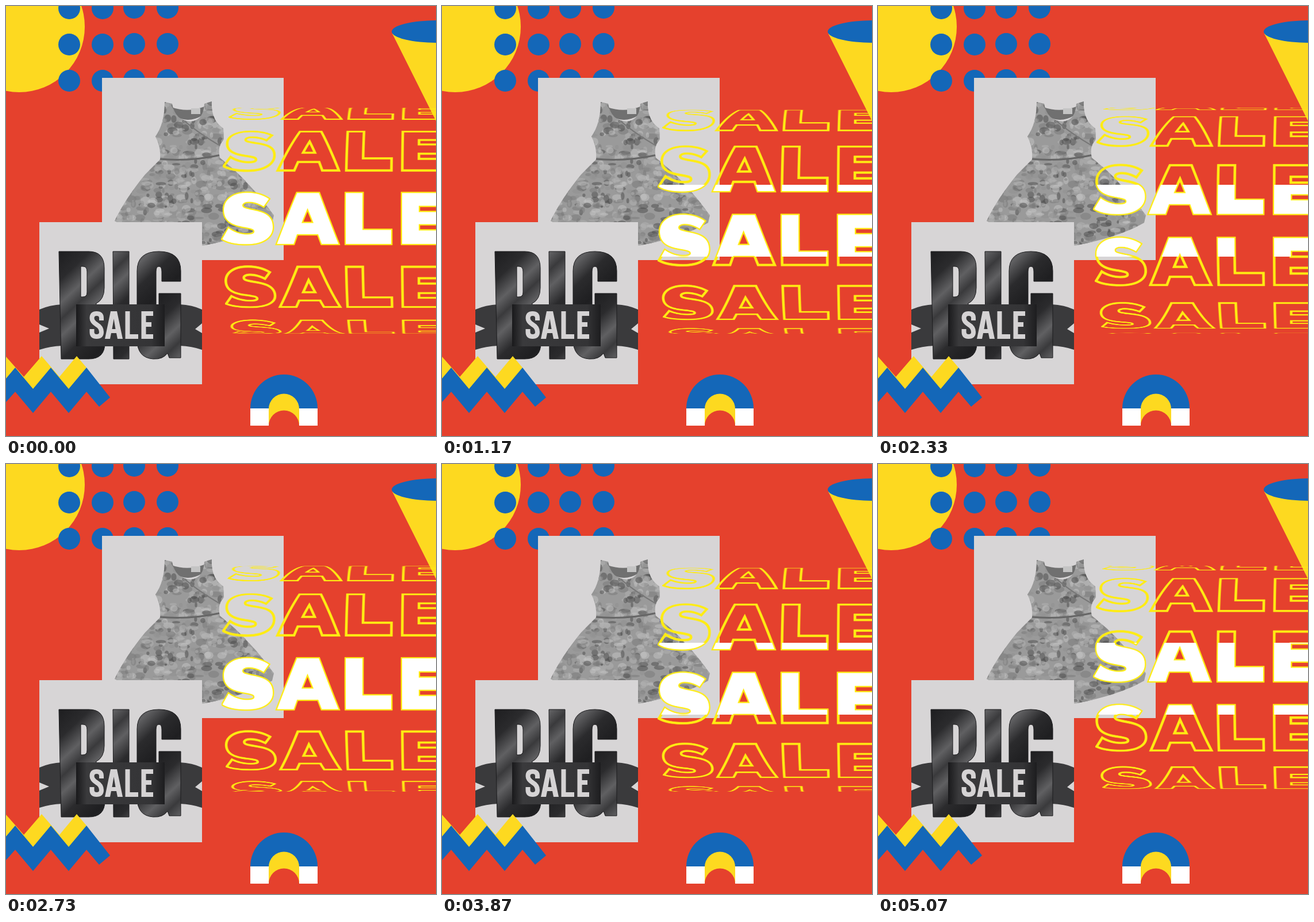
Recreate the animation shown at these times as an HTML page with a canvas. Size 748x748 px, loop 5.11 s.

```html
<!DOCTYPE html>
<html lang="en">
<head>
<meta charset="utf-8">
<title>Big sale</title>
<style>
html, body { margin: 0; width: 748px; height: 748px; overflow: hidden; background: #e5412d; }
svg, canvas { position: absolute; left: 0; top: 0; display: block; }
</style>
</head>
<body>
<svg width="748" height="748" viewBox="0 0 748 748" role="img" aria-label="Big sale">
  <defs>
    <linearGradient id="shine" gradientUnits="userSpaceOnUse" x1="92" y1="432" x2="150" y2="494" spreadMethod="reflect">
      <stop offset="0" stop-color="#1f1f21"/><stop offset=".4" stop-color="#2b2b2d"/>
      <stop offset=".75" stop-color="#606062"/><stop offset="1" stop-color="#3a3a3c"/>
    </linearGradient>
    <linearGradient id="band">
      <stop offset="0" stop-color="#19191b"/><stop offset=".12" stop-color="#3a3a3c"/>
      <stop offset=".85" stop-color="#343436"/><stop offset="1" stop-color="#1d1d1f"/>
    </linearGradient>
    <clipPath id="dress">
      <path d="M276 167 L289 170 Q294 200 322 201 Q344 198 345 170 L358 166 Q356 198 378 213 L379 232 Q367 244 372 264 L398 286 Q436 322 466 364 L463 377 Q420 402 342 417 Q270 412 189 374 Q207 336 242 293 L268 267 Q270 246 260 227 Q276 204 276 167Z"/>
    </clipPath>
  </defs>

  <rect width="748" height="748" fill="#e5412d"/>
  <circle cx="23" cy="36" r="114" fill="#fdd920"/>
  <g id="dots" fill="#1467b8"></g>
  <path d="M672 48 L748 200 V44Z" fill="#fdd920"/>
  <ellipse cx="750" cy="44.5" rx="79" ry="19.5" fill="#1467b8"/>

  <rect x="167" y="125" width="316" height="317" fill="#d7d5d6"/>
  <path d="M288 176 Q316 186 345 175 L342 190 Q316 206 292 190Z" fill="#707070"/>
  <rect x="322" y="178" width="16" height="10" fill="#c4c4c4"/>
  <g clip-path="url(#dress)">
    <rect x="180" y="160" width="290" height="260" fill="#9a9a9a"/>
    <g id="print"></g>
    <path d="M266 266 Q320 271 374 259" fill="none" stroke="#666" stroke-width="3"/>
    <path d="M288 172 Q302 202 374 244" fill="none" stroke="#777" stroke-width="2"/>
  </g>

  <rect x="58" y="376" width="283" height="282" fill="#d7d5d6"/>
  <path d="M58 528 Q76 520 98 519 H302 Q324 520 341 528 V552 L329 562 L341 569 V598 Q324 592 302 591 H98 Q76 592 58 598 V568 L75 561 L58 554Z" fill="#3a3a3c"/>
  <g fill="url(#shine)" fill-rule="evenodd" stroke="#1b1b1d" stroke-width="1">
    <path d="M92 427 H144 Q171 427 171 456 V490 Q171 511 156 518 Q172 526 172 546 V586 Q172 614 144 614 H96Z M130 453 H134 Q141 453 141 462 V498 Q141 506 134 506 H130Z"/>
    <path d="M186 427 H214 V614 H187Z"/>
    <path d="M228 461 Q228 427 266 427 Q304 427 304 461 V479 H271 V462 Q271 453 266 453 Q261 453 261 462 V578 Q261 588 267 588 Q272 588 272 578 V526 H266 V500 H304 V612 H284 L281 604 Q273 615 256 614 Q228 612 228 580Z"/>
  </g>
  <rect x="122" y="519" width="154" height="73" fill="url(#band)"/>
  <path fill="none" stroke="#d5d3d4" stroke-width="8" d="M166 547 V543 Q166 535 157.500 535 Q149.500 535 149.500 543 Q149.500 549 157.500 554 Q166 559 166 567 Q166 575 157.500 575 Q149.500 575 149.500 567 V562 M211.500 531 V575 H230 M256 535 H239.500 V575 H256 M239.500 554 H253"/>
  <path fill="#d5d3d4" fill-rule="evenodd" d="M172 579 L182 531 H193 L203 579 H194 L192 569 H183 L181 579Z M184.500 562 H190.500 L187.500 544Z"/>

  <path d="M0 610 L31 645 L62 609 L93 645 L123 609 L140 629 L109 670 L78 640 L47 670 L16 640 L0 652Z" fill="#fdd920"/>
  <path d="M0 648 L16 629 L47 666 L78 629 L109 666 L140 629 L181 681 L162 697 L140 671 L109 708 L78 671 L47 708 L16 671 L0 689Z" fill="#1467b8"/>

  <path d="M425 700 A58.500 59 0 0 1 542 700Z" fill="#1467b8"/>
  <rect x="425" y="700" width="117" height="30" fill="#fff"/>
  <path d="M457 730 V701 A26.500 26.500 0 0 1 510 701 V730Z" fill="#fdd920"/>
  <path d="M457 730 A26.500 26.500 0 0 1 510 730Z" fill="#e5412d"/>
</svg>
<canvas id="roll" width="748" height="748"></canvas>

<script>
const SVG = 'http://www.w3.org/2000/svg';

function add(parent, tag, attrs) {
  const el = document.createElementNS(SVG, tag);
  for (const k in attrs) el.setAttribute(k, attrs[k]);
  parent.append(el);
}

const dots = document.getElementById('dots');
for (const cy of [4, 67, 130])
  for (const cx of [110, 168, 223, 281])
    add(dots, 'circle', { cx, cy: cx > 200 ? cy - 1 : cy, r: 19 });

// Mottled fabric
let seed = 11;
const rnd = () => (seed = (seed * 16807) % 2147483647) / 2147483647;
const print = document.getElementById('print');
for (let i = 0; i < 900; i++) {
  const tone = ['#4c4c4c', '#7a7a7a', '#b4b4b4', '#c6c6c6', '#929292'][i % 5];
  add(print, 'ellipse', {
    cx: 185 + rnd() * 285, cy: 162 + rnd() * 258,
    rx: 2 + rnd() * 8, ry: 2 + rnd() * 5, fill: tone, opacity: 0.5
  });
}

// Lettering, in units where the front row is 94 high and starts at x = 374
const word = new Path2D(
  'M83 13C73 6 60 2 45 2C19 2 5 15 5 32C5 58 31 60 46 63C55 65 58 66 58 70C58 73 54 75 45 75' +
  'C34 75 22 71 13 64L2 83C13 90 28 92 44 92C74 92 90 79 90 62C90 36 64 35 48 31' +
  'C40 29 37 28 37 24C37 21 41 18 48 18C56 18 64 20 74 26Z' +
  'M97 91.500L132 2.500H170L204 91.500H175L169 74.500H132L126 91.500ZM150.500 29L140 55H161Z' +
  'M217 2.500H246V67H296V91.500H217Z' +
  'M315 2.500H388V25H344V36H382V57H344V68H389V91.500H315Z');

const TILE = 262, WIDE = 398, LEFT = 374;

function texture(paint) {
  const c = document.createElement('canvas');
  c.width = WIDE * 2;
  c.height = TILE;
  const g = c.getContext('2d');
  g.scale(2, 2);
  g.translate(0, TILE / 4 - 47);
  paint(g);
  return c;
}
const outline = texture(g => {
  g.strokeStyle = '#ffec12';
  g.lineWidth = 4.6;
  g.stroke(word);
});
const solid = texture(g => {
  g.fillStyle = '#fff';
  g.fill(word, 'evenodd');
});

// Cylinder seen with slight perspective; angles in radians
const R = 209, DEPTH = 0.065, MID = 373.5, PITCH = Math.PI / 5;
const TOP = 177, BOTTOM = 570, WHITE_TOP = 311, WHITE_BOTTOM = 436;
const rim = Math.acos(DEPTH / (1 + DEPTH));
const shrink = a => 1 / (1 + DEPTH * (1 - Math.cos(a)));

function angleAt(y) {
  const u = Math.abs(y - MID) / R;
  let lo = 0, hi = rim;
  for (let i = 0; i < 30; i++) {
    const m = (lo + hi) / 2;
    if (Math.sin(m) * shrink(m) < u) lo = m; else hi = m;
  }
  return Math.sign(y - MID) * lo;
}

const lines = [];
for (let y = TOP; y < BOTTOM; y++) {
  const a = angleAt(y), b = angleAt(y + 1);
  if (b - a > 1e-4) lines.push({ y, a, h: (b - a) / PITCH * TILE, s: shrink((a + b) / 2) });
}

const ctx = document.getElementById('roll').getContext('2d');
ctx.imageSmoothingQuality = 'high';

// Rotation in degrees by step
const spin = [[0, -1.1], [35, 153.5], [58, 254.5], [82, 362.5], [116, 513.5], [139, 614.5], [152, 673]];
const LOOP = 5110, STEP = 100 / 3, LAST = 152;

function rotation(n) {
  let i = 1;
  while (spin[i][0] < n) i++;
  const [n0, r0] = spin[i - 1], [n1, r1] = spin[i];
  return (r0 + (r1 - r0) * (n - n0) / (n1 - n0)) * Math.PI / 180;
}

function draw(n) {
  const turn = rotation(n);
  ctx.clearRect(0, 0, 748, 748);
  for (const { y, a, h, s } of lines) {
    const row = (a - turn) / PITCH + 0.5;
    const v = (row - Math.floor(row)) * TILE;
    const span = Math.min(h, TILE - v);
    if (span <= 0) continue;
    const place = img => ctx.drawImage(img, 0, v, WIDE * 2, span, 748 - LEFT * s, y, WIDE * s, 1);
    place(outline);
    if (y >= WHITE_TOP && y < WHITE_BOTTOM) place(solid);
  }
}

const start = performance.now();
let shown = -1;
function tick() {
  const t = (performance.now() - start) % LOOP;
  const n = Math.min(LAST, Math.floor((t + 5) / STEP));
  if (n !== shown) draw(shown = n);
  requestAnimationFrame(tick);
}
tick();
</script>
</body>
</html>
```
